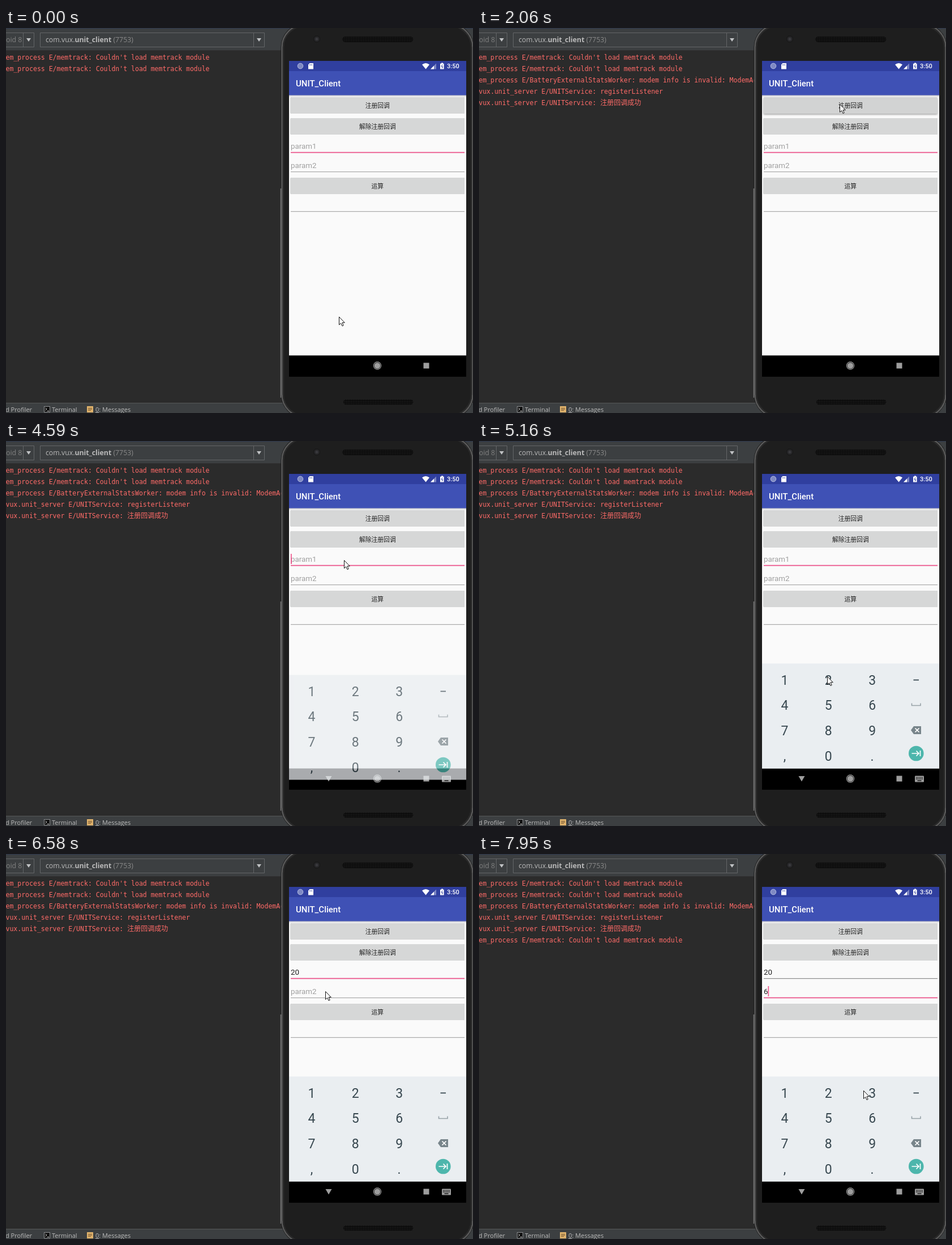
Animation of 825 by 679 pixels, one loop 8000 ms. Source, as an HTML page:

```html
<!DOCTYPE html>
<html lang="zh-CN">
<head>
<meta charset="utf-8">
<title>Callback demo</title>
<style>
html, body { margin: 0; width: 100%; height: 100%; overflow: hidden; background: #2b2b2b; }
svg { display: block; width: 825px; height: 679px; }
text { white-space: pre; }
.log { font: 11.5px "DejaVu Sans Mono", "Noto Sans CJK SC", "Noto Sans CJK", monospace; fill: #ff6b68; }
.log .zh { font-size: 12px; }
.ide { font: 12.3px "Open Sans", sans-serif; fill: #bbb; }
.tab { font-size: 11px; }
.app { font: 13.4px Roboto, sans-serif; fill: #212121; }
.hint { fill: #a0a0a0; }
.btn { font: 500 10.8px "Noto Sans CJK SC", "Noto Sans CJK", sans-serif; fill: #222; text-anchor: middle; }
.key { font: 23px Roboto, sans-serif; fill: #37474f; text-anchor: middle; }
.white { font-weight: 500; fill: #fff; }
</style>
</head>
<body>
<svg viewBox="0 0 825 679">
  <defs>
    <pattern id="mesh" width="3" height="3" patternUnits="userSpaceOnUse">
      <rect width="3" height="3" fill="#0b0b0b"/>
      <circle cx="1.5" cy="1.5" r=".8" fill="#262626"/>
    </pattern>
    <linearGradient id="shade" x2="0" y2="1">
      <stop stop-color="#bcbcc4"/>
      <stop offset="1" stop-color="#fafafa"/>
    </linearGradient>
  </defs>

  <!-- IDE window -->
  <rect width="825" height="679" fill="#2b2b2b"/>
  <rect width="825" height="39" fill="#3c3f41"/>
  <rect width="825" height="1.5" fill="#323b4b"/>
  <rect y="39" width="825" height="1" fill="#323232"/>
  <g fill="none" stroke="#646668">
    <path d="M-5 8.5H49.5V33.5H-5M30.5 8V33"/>
    <path d="M60.5 8.5H456.5V33.5H60.5ZM437.5 8V33"/>
  </g>
  <path d="M36 18h8l-4 6zM443 18h8l-4 6z" fill="#c0c2c4"/>
  <text class="ide" x="0" y="25" style="fill:#808080">oid 8</text>
  <text class="ide" x="70" y="25">com.vux.<tspan font-weight="700">unit_client</tspan><tspan fill="#8a8a8a"> (7753)</tspan></text>
  <g id="log"></g>
  <rect y="661" width="825" height="18" fill="#3c3f41"/>
  <rect y="661" width="825" height="1" fill="#555758"/>
  <text class="ide tab" x="-1" y="677">d Profiler</text>
  <rect x="67.5" y="667.5" width="10" height="10" fill="#111" stroke="#8d8f91"/>
  <path d="M69.5 670l2.5 2.2-2.5 2.2M73 675.5h3" fill="none" stroke="#ddd"/>
  <text class="ide tab" x="81" y="677">Terminal</text>
  <rect x="143" y="667" width="11" height="11" fill="#e0b36c"/>
  <path d="M145 670.5h7M145 672.5h7M145 674.5h5" stroke="#7a5a34"/>
  <text class="ide tab" x="158" y="677"><tspan text-decoration="underline">0</tspan>: Messages</text>

  <!-- phone -->
  <rect x="485.5" y="-8" width="341" height="696" rx="42" fill="#111"/>
  <rect x="487.5" y="-6" width="337" height="692" rx="40" fill="#1e1e1e" stroke="#5a5a5a" stroke-width="2.6"/>
  <rect x="490" y="-3.5" width="332" height="687" rx="37" fill="none" stroke="#2a2a2a" stroke-width="2.4"/>
  <path d="M485.5 283V652" stroke="#777" stroke-width="1.5"/>
  <circle cx="549" cy="19.5" r="5.5" fill="#262628" stroke="#151515"/>
  <circle cx="549" cy="19.5" r="2.5" fill="#38383c"/>
  <rect x="594" y="15" width="125.5" height="10" rx="5" fill="url(#mesh)"/>
  <rect x="596" y="655" width="123.5" height="9.5" rx="4.7" fill="url(#mesh)"/>

  <!-- app -->
  <rect x="500" y="58" width="313" height="557" fill="#fafafa"/>
  <rect x="500" y="118" width="313" height="4" fill="url(#shade)"/>
  <rect x="500" y="58" width="313" height="18.5" fill="#303f9f"/>
  <rect x="500" y="76" width="313" height="42.5" fill="#3f51b5"/>
  <circle cx="520" cy="67" r="4.8" fill="#7f8ac4" stroke="#b4bbe0"/>
  <path d="M536.5 62H543V72.5H534V64.5z" fill="#fff"/>
  <path d="M536.5 64v2M538.5 64v2M540.5 64v2" stroke="#303f9f" stroke-width=".8"/>
  <path d="M735 64.5Q741.5 59.5 748 64.5L741.5 72.5z" fill="#fff"/>
  <path d="M760 62.5V72.5H750z" fill="#7d87c3"/>
  <path d="M756 66.5V72.5H750z" fill="#fff"/>
  <path d="M769 61.5h3v1.2h1.6v9.8h-6.6V62.7h2z" fill="#fff"/>
  <path d="M771 64.5l-2 3.5h2.6l-1.2 3" fill="none" stroke="#303f9f"/>
  <text class="app white" x="779" y="71.2" style="font-size:11px">3:50</text>
  <text class="app white" x="512" y="103" style="font-size:15px">UNIT_Client</text>
  <g id="buttons"></g>
  <rect id="line1" x="503" width="307"/>
  <rect id="line2" x="503" width="307"/>
  <rect x="503" y="323" width="307" height="1.2" fill="#aaa"/>
  <text id="field1" class="app" x="503" y="213"></text>
  <text id="field2" class="app" x="503" y="247.3"></text>
  <rect id="caret" width="1.7" height="18" fill="#f0568c"/>

  <!-- navigation bar -->
  <rect x="500" y="577.5" width="313" height="37.5" fill="#000"/>
  <g fill="#9e9e9e">
    <circle cx="656" cy="595.5" r="5.3"/>
    <circle cx="656" cy="595.5" r="6.6" fill="none" stroke="#9e9e9e" stroke-width="1.2"/>
    <rect x="737.5" y="590.5" width="10" height="10"/>
    <g id="extra">
      <path d="M564.5 591h11l-5.5 9.5z"/>
      <rect x="770" y="590.5" width="16" height="11" rx="1.2"/>
      <path d="M772 593.5h12M772 596h12" stroke="#000" stroke-width="1.4" stroke-dasharray="1.4 1.2"/>
      <path d="M774.5 599h7" stroke="#000" stroke-width="1.3"/>
    </g>
  </g>

  <g id="pad">
    <rect x="500" y="392.5" width="313" height="185" fill="#eaeef1"/>
    <g id="keys"></g>
    <path d="M767.5 421.5h9.5" stroke="#37474f" stroke-width="1.8"/>
    <path d="M764.5 462.5v4h15.5v-4" fill="none" stroke="#98a2a8" stroke-width="1.6"/>
    <path d="M763 510l5-7h13v14h-13z" fill="#78858b"/>
    <path d="M770.5 506.5l7 7m0-7l-7 7" stroke="#fff" stroke-width="1.7"/>
    <circle cx="772.3" cy="551" r="13.3" fill="#4db6ac"/>
    <path d="M764.5 551h12M772.5 546.5l4.5 4.5-4.5 4.5M779.5 546v10" fill="none" stroke="#fff" stroke-width="1.7"/>
  </g>

  <path id="mouse" d="M.5.5V14.5L3.7 11.6 6 16.6 8.2 15.6 6 10.7H10.3z" fill="#fff" stroke="#111"/>
</svg>
<script>
const LOOP = 8000, STEP = 137;
const $ = id => document.getElementById(id);

// pointer legs: start time, number of steps, destination
const legs = [
  [0, 1, 588, 509],
  [120, 8, 637, 134],
  [2480, 1, 661, 133],
  [3410, 1, 642, 139],
  [3560, 6, 597, 210],
  [4740, 4, 615, 415],
  [5439, 3, 622, 557],
  [6153, 4, 564, 242],
  [7130, 4, 688, 467],
  [7950, 1, 679, 417]
];

// input events: time, focused field, both values; each restarts the caret blink
const inputs = [
  [-600, 1, "", ""],
  [4340, 1, "", ""],
  [5439, 1, "2", ""],
  [6010, 1, "20", ""],
  [6870, 2, "20", ""],
  [7830, 2, "20", "6"]
];

const memtrack = "em_process E/memtrack: Couldn't load memtrack module";
const logLines = [
  [0, memtrack],
  [0, memtrack],
  [806, "em_process E/BatteryExternalStatsWorker: modem info is invalid: ModemAc"],
  [2060, "vux.unit_server E/UNITService: registerListener"],
  [2060, 'vux.unit_server E/UNITService: <tspan class="zh">注册回调成功</tspan>'],
  [6867, memtrack]
];

$("log").innerHTML = logLines
  .map(([, s], i) => `<text class="log" x="-.5" y="${56 + 20 * i}">${s}</text>`).join("");

$("buttons").innerHTML = [[122, "注册回调"], [159, "解除注册回调"], [264, "运算"]]
  .map(([y, s]) => `<rect x="502.5" y="${y}" width="307.5" height="29" rx="1.8" fill="#d6d7d7"/>
    <text class="btn" x="656.3" y="${y + 18.5}">${s}</text>`).join("");

$("keys").innerHTML = ["123", "456", "789", ",0."]
  .map((row, r) => [...row].map((c, k) =>
    `<text class="key" x="${540 + 77.3 * k}" y="${429.5 + 44.8 * r}">${c}</text>`).join("")).join("");

const logNodes = [...$("log").children];
const buttons = [...$("buttons").querySelectorAll("rect")];

const ease = p => p * p * (3 - 2 * p);
const show = (node, on) => node.setAttribute("visibility", on ? "visible" : "hidden");
const set = (node, attrs) => {
  for (const k in attrs) node.setAttribute(k, attrs[k]);
};

function pointer(t) {
  let x = 0, y = 0;
  for (const [start, steps, toX, toY] of legs) {
    if (t < start) break;
    const done = Math.min(steps, Math.floor((t - start) / STEP) + 1);
    const p = ease(done / steps);
    x += (toX - x) * p;
    y += (toY - y) * p;
  }
  return [x, y];
}

function drawField(n, value, focused) {
  const field = $("field" + n);
  field.textContent = value || "param" + n;
  field.setAttribute("class", value ? "app" : "app hint");
  const y = 219 + 34 * (n - 1);
  set($("line" + n), focused
    ? { y: y - .3, height: 1.7, fill: "#ea4f87" }
    : { y, height: 1.2, fill: value ? "#8b8b8b" : "#a9a9a9" });
}

function draw(t) {
  $("mouse").setAttribute("transform", `translate(${pointer(t).map(Math.round)})`);

  logNodes.forEach((node, i) => show(node, t >= logLines[i][0]));

  const pressed = t >= 1920 && t < 2190;
  buttons.forEach((b, i) => {
    const down = pressed && i === 0;
    b.setAttribute("fill", down ? "#d2d3d3" : "#d6d7d7");
    b.style.filter = `drop-shadow(0 ${down ? 2 : .8}px ${down ? 1.8 : .7}px rgba(0,0,0,.3))`;
  });

  const [since, focus, ...values] = inputs.filter(e => e[0] <= t).pop();
  values.forEach((v, i) => drawField(i + 1, v, focus === i + 1));
  set($("caret"), { x: 503 + 7.5 * values[focus - 1].length, y: 165 + 34 * focus });
  show($("caret"), (t - since) % 1000 < 500);

  show($("extra"), t >= 4340);
  show($("pad"), t >= 4590);
  const rising = t < 4740;
  set($("pad"), { opacity: rising ? .72 : 1, transform: `translate(0 ${rising ? 20 : 0})` });
}

const start = performance.now();
function tick() {
  draw((performance.now() - start) % LOOP);
  requestAnimationFrame(tick);
}
tick();
</script>
</body>
</html>
```
